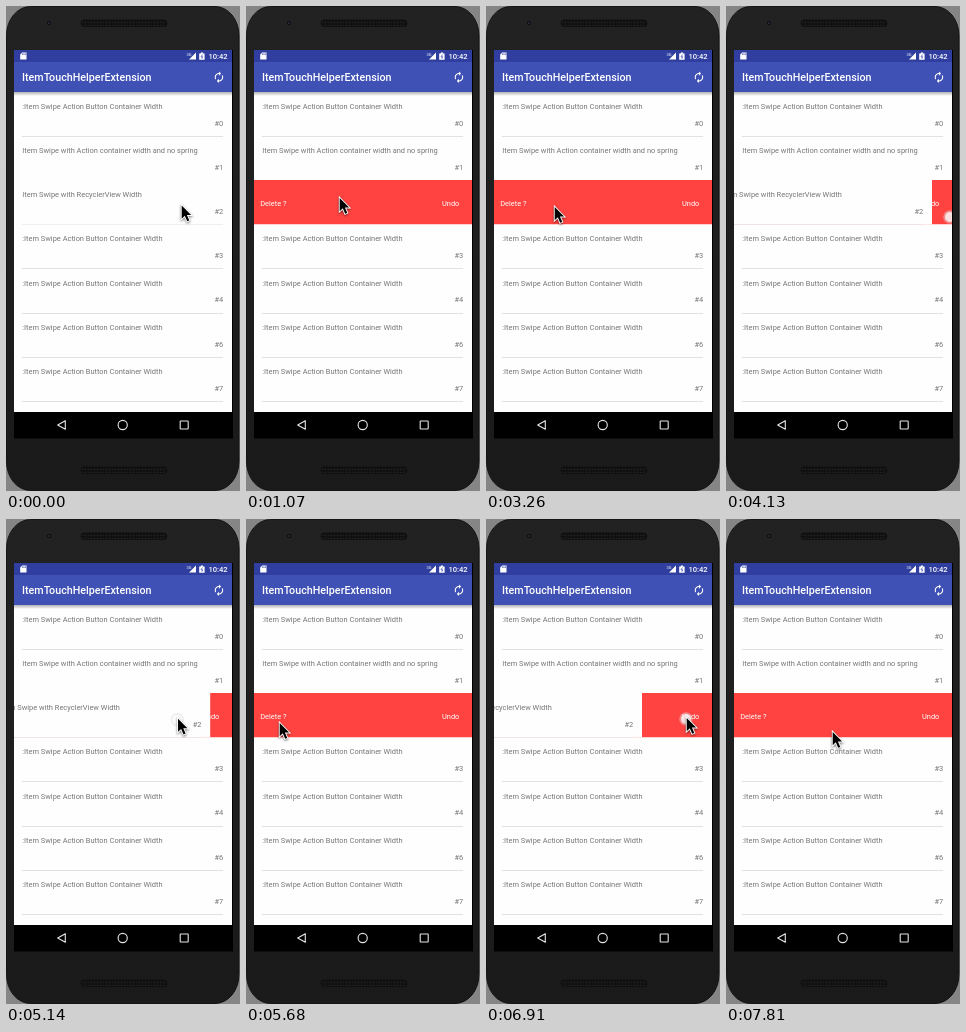
These frames come from a looping animation (234x485 px, 8 s). An HTML page:

```html
<!DOCTYPE html>
<html lang="en">
<head>
<meta charset="utf-8">
<title>Swipe to delete</title>
<style>
html, body { margin: 0; width: 100%; height: 100%; overflow: hidden; background: #858585; }
svg { display: block; width: 234px; height: 485px; }
text { font: 7.44px Roboto, sans-serif; fill: #757575; }
.light { fill: #fff; }
.end { text-anchor: end; }
.title { font-size: 10.73px; font-weight: 500; }
.clock { font-size: 7.6px; font-weight: 500; }
#arrow { filter: drop-shadow(.5px 1px .8px #0008); }
</style>
</head>
<body>
<svg viewBox="0 0 234 485">
  <defs>
    <clipPath id="screen"><path d="M8 44h218v388H8z"/></clipPath>
    <clipPath id="row"><path d="M8 174h218v44.5H8z"/></clipPath>
    <linearGradient id="shade" x2="0" y2="1">
      <stop stop-color="#000" stop-opacity=".3"/>
      <stop offset="1" stop-color="#000" stop-opacity="0"/>
    </linearGradient>
    <linearGradient id="shell" x2="0" y2="1">
      <stop stop-color="#222"/>
      <stop offset="1" stop-color="#1a1a1a"/>
    </linearGradient>
    <pattern id="mesh" width="3" height="3" patternUnits="userSpaceOnUse">
      <path d="M0 0h3v3H0z" fill="#101010"/>
      <circle cx="1.5" cy="1.5" r=".8" fill="#262626"/>
    </pattern>
  </defs>

  <!-- phone body -->
  <rect x=".5" y=".5" width="232.5" height="484" rx="24" ry="29" fill="url(#shell)" stroke="#151515"/>
  <circle cx="43" cy="17" r="3.2" fill="#111214" stroke="#2a2a2d"/>
  <circle cx="43" cy="17" r="1" fill="#29303c"/>
  <rect x="75" y="14" width="86" height="6.5" rx="3.2" fill="url(#mesh)" stroke="#101010"/>
  <rect x="75" y="461" width="86" height="6.5" rx="3.2" fill="url(#mesh)" stroke="#101010"/>
  <path d="M8 44h219v388.5H8z"/>

  <!-- list -->
  <path d="M8 86h218v320H8z" fill="#fefefe"/>
  <g id="list"></g>
  <g clip-path="url(#row)">
    <path id="under" d="M8 174h218v44.5H8z" fill="#ff4340"/>
    <text class="light" x="14.2" y="199.5">Delete ?</text>
    <text class="light" x="196" y="199.5">Undo</text>
    <g id="slide"><path d="M8 173h218v47H8z" fill="#fefefe"/></g>
  </g>

  <!-- bars -->
  <path d="M8 86h218v4H8z" fill="url(#shade)"/>
  <path d="M8 56h218v30H8z" fill="#3f51b5"/>
  <path d="M8 44h218v12H8z" fill="#303f9f"/>
  <text class="light title" x="16" y="75.4">ItemTouchHelperExtension</text>
  <path class="light" transform="translate(206.6 64.9) scale(.53)" d="M12 6v3l4-4-4-4v3c-4.42 0-8 3.58-8 8 0 1.57.46 3.03 1.24 4.26L6.7 14.8c-.45-.83-.7-1.79-.7-2.8 0-3.31 2.69-6 6-6zm6.76 1.74L17.3 9.2c.44.84.7 1.79.7 2.8 0 3.31-2.69 6-6 6v-3l-4 4 4 4v-3c4.42 0 8-3.58 8-8 0-1.57-.46-3.03-1.24-4.26z"/>
  <path class="light" d="M16.2 46.6h4.3v7h-6.3v-5zM183 53.6l7-7v7zM194.8 46.6h2.2v.9h1.6v6.2h-5.4v-6.2h1.6z"/>
  <path d="M16.6 47.4v1.6M18 47.4v1.6M19.4 47.4v1.6M196.4 48.5l-1.4 2.3h1.8l-1 1.9" fill="none" stroke="#303f9f" stroke-width=".7"/>
  <text class="light" x="180.5" y="50" style="font-size:4px">3G</text>
  <text class="light clock end" x="221.7" y="53">10:42</text>
  <g fill="none" stroke="#e6e6e6" stroke-width="1.1">
    <path d="M59.3 414.7v8.6l-7.6-4.3z" stroke-linejoin="round"/>
    <circle cx="116.7" cy="419" r="4.6"/>
    <rect x="174.2" y="415" width="8" height="8" rx=".5"/>
  </g>

  <!-- pointer -->
  <g clip-path="url(#screen)">
    <g id="dot">
      <circle r="6.8" fill="#ddd" fill-opacity=".45"/>
      <circle r="5" fill="#fff" fill-opacity=".75"/>
    </g>
  </g>
  <path id="arrow" d="M.7 1v13.2l3.1-2.9 2.4 5.5 2.1-.9-2.4-5.3h4.2z" stroke="#fff" stroke-width="1.8" paint-order="stroke"/>
</svg>
<script>
const $ = id => document.getElementById(id);
const plain = ':Item Swipe Action Button Container Width';
const rows = [
  [plain, 0], ['Item Swipe with Action container width and no spring', 1],
  ['Item Swipe with RecyclerView Width', 2],
  [plain, 3], [plain, 4], [plain, 6], [plain, 7]
];
rows.forEach(([label, id], i) => {
  const y = 86 + i * 44.2;
  $(id === 2 ? 'slide' : 'list').insertAdjacentHTML('beforeend',
    `<text x="16.3" y="${y + 16.7}">${label}</text>
     <text class="end" x="217.3" y="${y + 33.5}">#${id}</text>
     <path d="M16 ${Math.floor(y + 44.3) + .5}h201" stroke="#e2e2e2"/>`);
});

// Touch: NONE, FLING (released when the move ends), HOLD (stays down)
const NONE = 0, FLING = 1, HOLD = 2, OPEN = -218;
// start, end, steps, pointer x, pointer y, row offset, touch
const moves = [
  [60, 60, 1, 175, 199, 0, HOLD],
  [240, 600, 7, 31, 203, OPEN, FLING],
  [950, 1070, 3, 93, 191, OPEN, NONE],
  [1130, 1290, 4, 190, 200, OPEN, NONE],
  [1590, 1640, 2, 196, 201, OPEN, HOLD],
  [1940, 2060, 2, 196, 201, 0, NONE],
  [2540, 3020, 8, 75, 201, OPEN, FLING],
  [3260, 3260, 1, 68, 200, OPEN, NONE],
  [3320, 3480, 4, 28, 195, OPEN, HOLD],
  [3660, 4130, 9, 224, 209, -20, HOLD],
  [4310, 4430, 3, 224, 209, 0, NONE],
  [4670, 4960, 5, 192, 198, 0, HOLD],
  [5140, 5680, 10, 33, 203, OPEN, FLING],
  [5980, 6030, 2, 38, 204, OPEN, HOLD],
  [6210, 6910, 12, 200, 198, -70, HOLD],
  [6970, 7030, 2, 200, 198, -55, NONE],
  [7270, 7810, 10, 106, 212, OPEN, FLING]
];
const mix = (a, b, p) => a + (b - a) * p;

function pose(t) {
  let x = 175, y = 198.5, shift = 0, down = false;
  for (const [start, end, steps, tx, ty, offset, touch] of moves) {
    if (t < start) break;
    const step = Math.floor((t - start) / (end - start || 1) * (steps - 1) + 1e-6) + 1;
    const p = Math.min(1, step / steps);
    const ease = touch === HOLD ? p * p * (3 - 2 * p) : p;
    // a flung row keeps sliding after the finger has stopped
    const reach = touch === FLING ? Math.min(1, p * 1.3) : ease;
    x = mix(x, tx, reach);
    y = mix(y, ty, reach);
    shift = mix(shift, offset, ease);
    down = touch === HOLD || touch === FLING && p < 1;
  }
  return { x, y, shift, down };
}

function draw(now) {
  const { x, y, shift, down } = pose(now % 8000);
  $('slide').setAttribute('transform', `translate(${shift})`);
  $('under').style.display = shift ? '' : 'none';
  $('dot').setAttribute('transform', `translate(${x} ${y + 2})`);
  $('dot').style.display = down ? '' : 'none';
  $('arrow').setAttribute('transform', `translate(${x} ${y})`);
  $('arrow').style.display = x < 223 ? '' : 'none';
}

const began = performance.now();
function loop() {
  draw(performance.now() - began);
  requestAnimationFrame(loop);
}
loop();
</script>
</body>
</html>
```
